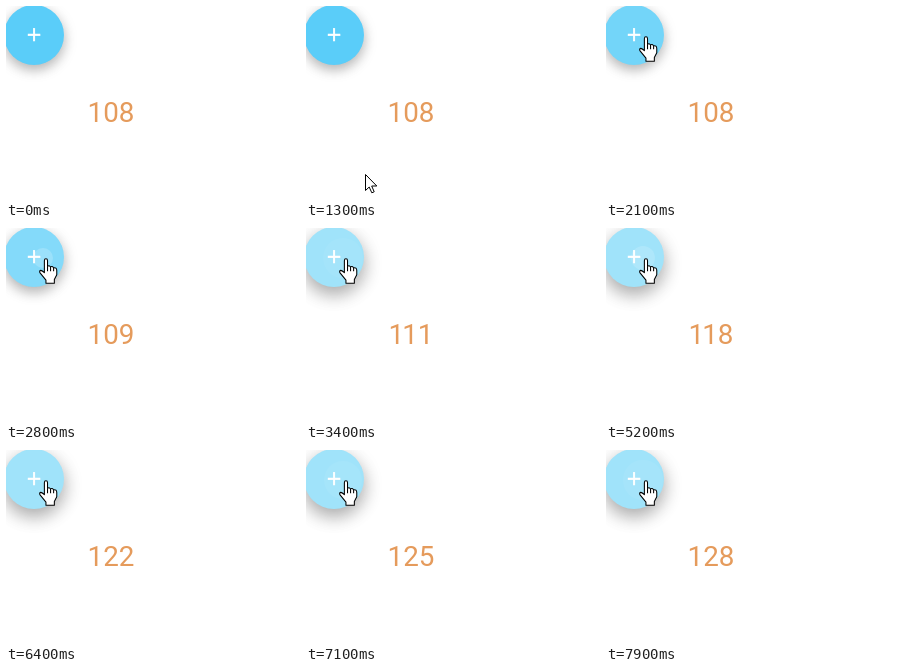
Recreate the animation shown at these times as an HTML page. Size 294x194 px, loop 8000 ms.

```html
<!DOCTYPE html>
<html lang="en">
<head>
<meta charset="utf-8">
<title>Click counter</title>
<style>
  html, body { margin: 0; width: 100%; height: 100%; overflow: hidden; background: #fff; }
  #button {
    position: absolute; left: -2px; top: -1px; width: 60px; height: 60px;
    border-radius: 50%; overflow: hidden;
  }
  #ripple { position: absolute; border-radius: 50%; background: #fff; }
  svg { position: absolute; left: 0; top: 0; }
  text { text-anchor: middle; }
  #plus { font: 25px "Liberation Sans", Arial, sans-serif; fill: #fff; stroke: #fff; stroke-width: .3; }
  #count { font: 27.8px Roboto, Arial, sans-serif; fill: #e59b5c; }
  #arrow, #hand { fill: #fff; stroke: #000; stroke-width: 1; stroke-linejoin: round; }
</style>
</head>
<body>
<div id="button"><div id="ripple"></div></div>
<svg width="294" height="194" viewBox="0 0 294 194">
  <text id="plus" x="28" y="36.9">+</text>
  <text id="count" x="105" y="116">108</text>
  <path id="arrow" d="M.5 .5V16.5L4.2 13L6.8 18.8L9.2 17.8L6.7 12H11.8Z"/>
  <g id="hand">
    <path d="M5.5 14V2.5Q5.5 .8 7 .8Q8.5 .8 8.5 2.5V8Q10 6.6 11.3 8.5Q13 7.3 14.2 9.3Q17.3 8.8 17.3 12V16L15 20.5V24H7V21L1.2 14Q.5 12 2.2 11.8Q3.6 12 5.5 14Z"/>
    <path d="M8.5 8v4.5M11.4 8.5v4M14.3 9.5v3" fill="none"/>
  </g>
</svg>
<script>
const LOOP = 8000, STEP = 100;
const FIRST_CLICK = 2730, CLICK_GAP = 265, RIPPLE_TIME = 300;
const SHOW = 1300, ARRIVE = 2100;
const FROM = [59, 168], TO = [39, 31];
const CENTER = [28, 29], RADIUS = 30;

// Steps are [time, value].
const LIGHT = [[1900, 0], [2100, .35], [2400, .35], [2800, .6], [3300, 1]];
const LIFT = [[2400, 0], [2800, .15], [3300, 1]];

const el = id => document.getElementById(id);
const [button, ripple, count, arrow, hand] =
  ['button', 'ripple', 'count', 'arrow', 'hand'].map(el);
const mix = (a, b, k) => a + (b - a) * k;
const clamp = k => Math.max(0, Math.min(1, k));

function track(steps, t) {
  let value = steps[0][1];
  for (let i = 1; i < steps.length; i++) {
    const [t0, a] = steps[i - 1], [t1, b] = steps[i];
    if (t >= t0) value = mix(a, b, clamp((t - t0) / (t1 - t0)));
  }
  return value;
}

function drawButton(t) {
  const light = track(LIGHT, t), lift = track(LIFT, t);
  const rgb = [mix(90, 160, light), mix(205, 227, light), mix(249, 250, light)];
  button.style.backgroundColor = `rgb(${rgb.map(Math.round).join()})`;
  button.style.boxShadow =
    `0 ${mix(5, 8, lift)}px ${mix(11, 17, lift)}px rgba(0,0,0,${mix(.18, .2, lift)}),` +
    `0 ${mix(4, 6, lift)}px ${mix(15, 20, lift)}px rgba(0,0,0,${mix(.15, .19, lift)})`;
}

function drawClicks(t) {
  const clicks = Math.max(0, Math.floor((t - FIRST_CLICK) / CLICK_GAP) + 1);
  const label = String(108 + clicks);
  count.textContent = label;
  // Kern a pair of ones.
  count.setAttribute('dx', label.startsWith('11') ? '0 -2' : '0');

  const age = t - FIRST_CLICK - (clicks - 1) * CLICK_GAP;
  const r = age * .145;
  ripple.hidden = !clicks;
  Object.assign(ripple.style, {
    left: TO[0] - r + 'px', top: TO[1] - r + 'px',
    width: 2 * r + 'px', height: 2 * r + 'px',
    opacity: .55 * clamp(1 - age / RIPPLE_TIME) ** 4
  });
}

function drawCursor(t) {
  const k = clamp((t - SHOW) / (ARRIVE - SHOW));
  const ease = k * k * (3 - 2 * k);
  const x = Math.round(mix(FROM[0], TO[0], ease));
  const y = Math.round(mix(FROM[1], TO[1], ease));
  const over = Math.hypot(x - CENTER[0], y - CENTER[1]) < RADIUS;
  arrow.style.display = t >= SHOW && !over ? '' : 'none';
  hand.style.display = t >= SHOW && over ? '' : 'none';
  arrow.setAttribute('transform', `translate(${x} ${y})`);
  hand.setAttribute('transform', `translate(${x - 6.4} ${y - 1}) scale(1.05)`);
}

const start = performance.now();
function frame() {
  const elapsed = (performance.now() - start) % LOOP;
  const t = Math.floor(elapsed / STEP) * STEP;
  drawButton(t);
  drawClicks(t);
  drawCursor(t);
  requestAnimationFrame(frame);
}
frame();
</script>
</body>
</html>
```
